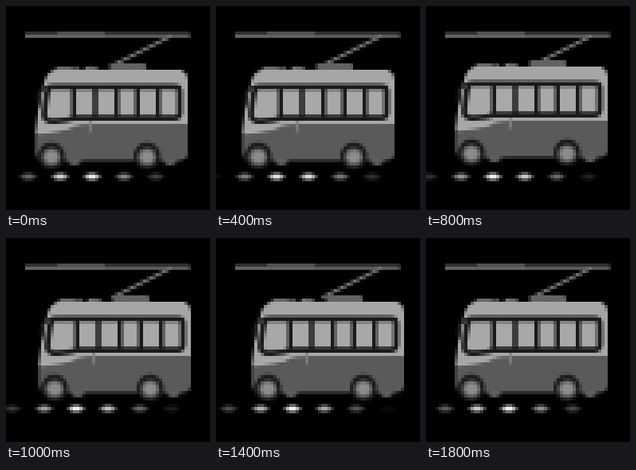
An HTML page with a canvas for the animation above (2000 ms loop, 256 px wide and 256 px high).

```html
<!DOCTYPE html>
<html lang="en">
<head>
<meta charset="utf-8">
<title>Trolleybus</title>
<style>
  html, body { margin: 0; width: 100%; height: 100%; overflow: hidden; background: #000; }
  canvas { display: block; width: 100vw; height: 100vh; image-rendering: pixelated; }
</style>
</head>
<body>
<canvas id="stage" width="64" height="64"></canvas>
<script>
const ctx = document.getElementById('stage').getContext('2d');
const STEP = 200;
const SWAY = [0, -4, -4, 0, 0, 4, 4, 8, 4, 0];
const LIFT = [0, 0, 0, -4, -4, 0, 0, 0, 0, 0];
const TUG = [0, -4, 0, 0, 0, 0, 0, 0, 0, 0];
// Road dash brightness: [x, level]
const GLOW = [[-8, 0], [5, 50], [28, 100], [48, 160], [68, 210], [84, 240], [106, 240],
  [125, 200], [148, 130], [168, 100], [188, 62], [206, 28], [222, 0]];

function fill(path, color) {
  ctx.fillStyle = color;
  ctx.fill(new Path2D(path));
}

function stroke(path, color, width) {
  ctx.strokeStyle = color;
  ctx.lineWidth = width;
  ctx.stroke(new Path2D(path));
}

function oval(x, y, rx, ry, color) {
  ctx.fillStyle = color;
  ctx.beginPath();
  ctx.ellipse(x, y, rx, ry, 0, 0, Math.PI * 2);
  ctx.fill();
}

function box(x, y, w, h, r, color) {
  ctx.fillStyle = color;
  ctx.beginPath();
  ctx.roundRect(x, y, w, h, r);
  ctx.fill();
}

function level(x) {
  for (let i = 1; i < GLOW.length; i++) {
    const [x0, a] = GLOW[i - 1], [x1, b] = GLOW[i];
    if (x >= x0 && x <= x1) return a + (b - a) * (x - x0) / (x1 - x0);
  }
  return 0;
}

function drawDash(x) {
  const v = Math.round(level(x));
  const soft = ctx.createRadialGradient(0, 0, 0.3, 0, 0, 1);
  soft.addColorStop(0, `rgb(${v},${v},${v})`);
  soft.addColorStop(1, '#000');
  ctx.save();
  ctx.translate(x, 214);
  ctx.scale(13, 6);
  oval(0, 0, 1, 1, soft);
  ctx.restore();
}

function drawWire(tug) {
  box(24, 32, 207, 4, 0, '#303030');
  box(64, 32, 60, 4, 0, '#505050');
  box(24, 36, 100, 4, 0, '#626262');
  box(124, 36, 107, 4, 0, '#595959');
  stroke(`M${133 + tug} 75L${207 + tug} 38`, '#7c7c7c', 4);
}

function drawWheel(x) {
  oval(x, 188, 17, 17, '#1c1c1c');
  oval(x, 189, 11.5, 11.5, '#5c5c5c');
  oval(x, 189, 8, 8, '#8c8c8c');
}

function drawBus() {
  // Roof gear
  box(130, 72, 46, 9, 2, '#626262');
  box(62, 77, 22, 5, 2, '#8a8a8a');
  stroke('M84 80L92 79M98 80L104 77L116 80', '#777', 4);
  // Far-side wheels
  oval(86, 195, 9, 4.5, '#626262');
  oval(206, 195, 9, 4.5, '#626262');
  // Body
  fill('M62 80H219Q228 81 228 92V160H37Q39 128 47 100Q50 82 62 80Z', '#a6a6a6');
  fill('M37 160Q62 158 78 153Q94 148 110 148H228V184Q228 194 218 194H46Q37 193 37 184Z', '#5a5a5a');
  stroke('M40 159Q65 157 82 152', '#b4b4b4', 3);
  stroke('M106 145V158', '#7c7c7c', 4);
  // Mirror
  stroke('M55 101Q42 102 41 112V126', '#222', 4);
  // Windows
  const frame = 'M58 101H213Q218 101 218 106V135Q218 140 213 140H88Q78 144 62 144H54Q48 143 48 137Q49 121 52 107Q53 101 58 101Z';
  fill(frame, '#a8a8a8');
  stroke(frame, '#1a1a1a', 7);
  for (const x of [85, 112, 139, 165, 191]) stroke(`M${x} 101V140`, '#1a1a1a', 6);
  drawWheel(57);
  drawWheel(177);
}

function render(now) {
  const step = Math.floor(now / STEP) % SWAY.length;
  ctx.setTransform(0.25, 0, 0, 0.25, 0, 0);
  ctx.fillStyle = '#000';
  ctx.fillRect(0, 0, 256, 256);
  for (let x = -12 + step * 4; x < 230; x += 40) drawDash(x);
  drawWire(TUG[step]);
  ctx.translate(SWAY[step], LIFT[step]);
  drawBus();
}

let start;
function tick(now) {
  start ??= now;
  render(now - start);
  requestAnimationFrame(tick);
}
render(0);
requestAnimationFrame(tick);
</script>
</body>
</html>
```
